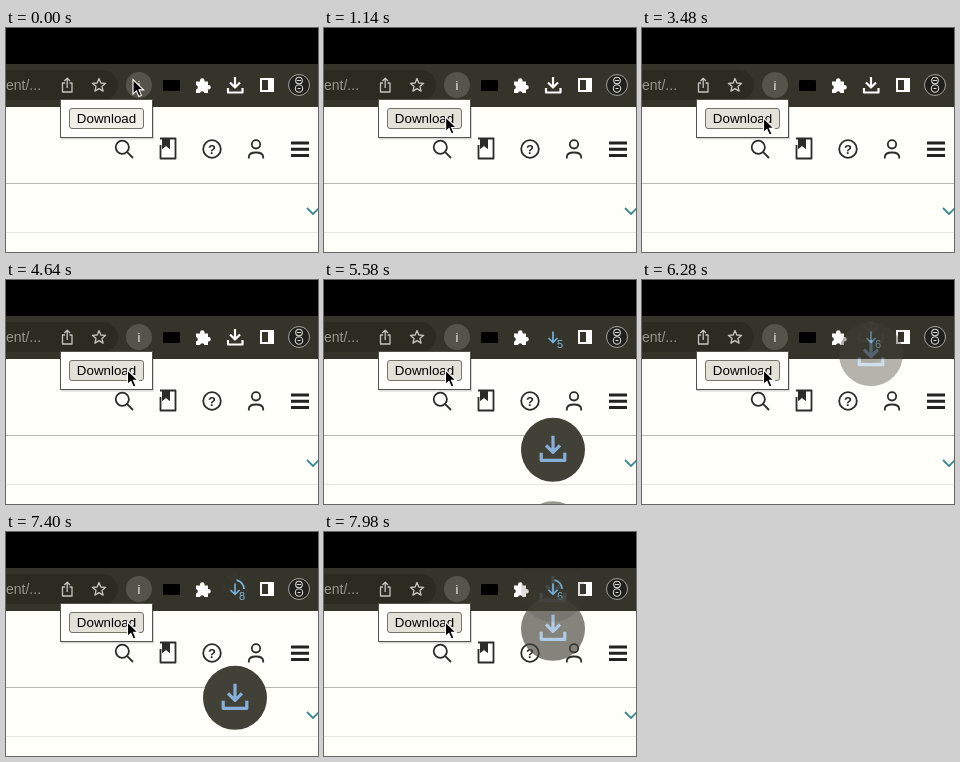
Animation, 312 px wide and 224 px high, one loop 8000 ms. Source, as an HTML page:

```html
<!DOCTYPE html>
<html lang="en">
<head>
<meta charset="utf-8">
<title>Download popup</title>
<style>
  html, body { margin: 0; width: 100%; height: 100%; overflow: hidden; background: #fffffa; }
  svg { display: block; width: 312px; height: 224px; }
  text { font-family: "Liberation Sans", Arial, sans-serif; }
  .line { fill: none; stroke-linejoin: round; }
</style>
</head>
<body>
<svg viewBox="0 0 312 224" xmlns="http://www.w3.org/2000/svg">
  <defs>
    <clipPath id="window"><rect y="41" width="312" height="183"/></clipPath>
    <g id="bubble">
      <circle r="32" fill="#424138"/>
      <path class="line" stroke="#86afd9" stroke-width="3.2" stroke-linejoin="miter"
        d="M0-14V2M-7-4.5L0 2.5L7-4.5M-11.8 3V10.5H11.8V3"/>
    </g>
  </defs>

  <!-- page -->
  <rect width="312" height="224" fill="#fffffa"/>
  <path d="M0 155.5H312" stroke="#b8b8b2"/>
  <path d="M0 204.5H312" stroke="#e6e6de"/>
  <path class="line" d="M301 180L307 186L313 180" stroke="#3d8c93" stroke-width="1.8"/>
  <g class="line" stroke="#2b2b28" stroke-width="1.8">
    <circle cx="116.3" cy="119.3" r="6.6"/>
    <path d="M121.2 124.2L127 130"/>
    <path d="M154.5 117V130.5H169.5V110.5H154"/>
    <path d="M156.5 111V120.5L160 117.5L163.5 120.5V111" fill="#2b2b28" stroke-width="1"/>
    <circle cx="206" cy="121" r="8.8"/>
    <circle cx="250" cy="116.3" r="4.2"/>
    <path d="M242.8 130.5V129Q243 124.5 250 124.5Q257 124.5 257.2 129V130.5"/>
  </g>
  <text x="206" y="125.6" font-size="13" font-weight="bold" text-anchor="middle" fill="#2b2b28">?</text>
  <path d="M285 115H303M285 121.2H303M285 127.4H303" stroke="#23231f" stroke-width="3"/>

  <!-- browser bar -->
  <rect width="312" height="36" fill="#000"/>
  <rect y="36" width="312" height="43" fill="#35342a"/>
  <rect x="-30" y="42" width="142" height="30" rx="15" fill="#2c2b22"/>
  <text x="0" y="62" font-size="14" fill="#96968c">ent/...</text>
  <g class="line" stroke="#c4c4be" stroke-width="1.3">
    <path d="M59 55H56.5V64H66V55H63.5M61.2 60V50.5M58.4 53L61.2 50.2L64 53"/>
    <path id="star"/>
  </g>
  <circle cx="133" cy="57" r="13" fill="#55544a"/>
  <text x="133" y="61.5" font-size="13" text-anchor="middle" fill="#eeeee8">i</text>
  <rect x="157" y="52" width="17" height="11" rx="1" fill="#000"/>
  <path fill="#fff" d="M190 53.5H194V52.5A2.3 2.3 0 0 1 198.6 52.5V53.5H202V57H202.5A2.3 2.3 0 0 1 202.5 61.6H202V65H198.5A2.3 2.3 0 0 0 194 65H190V61.5A2.3 2.3 0 0 0 190 57Z"/>
  <path id="idle" class="line" stroke="#fff" stroke-width="2.2" stroke-linejoin="miter"
    d="M229 49V59M224 54.5L229 59.5L234 54.5M222 60V64.5H236.5V60"/>
  <g id="busy">
    <path class="line" stroke="#72b2de" stroke-width="1.7" d="M229 51.5V62M224.5 58L229 62.5L233.5 58"/>
    <path id="ring" class="line" stroke="#7fbfe2" stroke-width="1.7"/>
    <text id="count" x="236" y="68" font-size="11" text-anchor="middle" fill="#86bfe4"></text>
  </g>
  <rect x="255" y="51" width="12" height="12" fill="none" stroke="#fff" stroke-width="2"/>
  <rect x="262" y="51" width="5" height="12" fill="#fff"/>
  <circle cx="293" cy="57" r="10.5" fill="#20201d" stroke="#a3a39c"/>
  <g class="line" stroke="#d8d8d0" stroke-width="1.1">
    <circle cx="293" cy="52.5" r="3.3"/>
    <circle cx="293" cy="60.5" r="3.7"/>
    <path d="M291 52.5H295M291.5 60.5H294.5"/>
  </g>

  <!-- popup -->
  <rect x="55" y="73" width="93" height="38.5" fill="#000" opacity=".15"/>
  <rect x="54.5" y="71.5" width="92" height="38" fill="#fffffc" stroke="#52524a"/>
  <rect id="button" x="63.5" y="80.5" width="74" height="20" rx="2.5" stroke="#74746a"/>
  <text x="100.5" y="95" font-size="13.333" text-anchor="middle" fill="#000">Download</text>

  <g id="bubbles" clip-path="url(#window)"></g>
  <path id="cursor" fill="#000" stroke="#fff" stroke-width="1.1"
    d="M0 0V14.5L3.4 11.4L5.8 17L8.4 15.9L6 10.4H10.6Z"/>
</svg>
<script>
const LOOP = 8000, RISE = 1200, BUSY_FROM = 4700;
const starts = [5229, 5480, 6300, 7035, 7321];
const counts = [[4700, 1], [4900, 2], [5080, 3], [5229, 4], [5480, 5],
  [5900, 6], [6300, 7], [7035, 8], [7600, 7], [7800, 6]];

const $ = id => document.getElementById(id);
const set = (el, attrs) => { for (const k in attrs) el.setAttribute(k, attrs[k]); };
const mix = (a, b, p) => a + (b - a) * p;
const clamp = v => Math.min(1, Math.max(0, v));
const smooth = p => p * p * (3 - 2 * p);
const easeOut = p => 1 - (1 - p) ** 2;
const polar = (x, y, r, deg) => {
  const a = deg * Math.PI / 180;
  return `${(x + r * Math.cos(a)).toFixed(2)} ${(y + r * Math.sin(a)).toFixed(2)}`;
};

const starPoints = Array.from({ length: 10 }, (_, i) =>
  polar(93, 57.5, i % 2 ? 3.1 : 7, i * 36 - 90));
set($('star'), { d: `M${starPoints.join('L')}Z` });

const bubbles = starts.map(() => {
  const use = document.createElementNS('http://www.w3.org/2000/svg', 'use');
  set(use, { href: '#bubble' });
  return $('bubbles').appendChild(use);
});

function buttonColor(t, y) {
  if (t >= 2500 && t < 2640) return '#f5f5ee';
  return y > 80 ? '#e2e2d9' : '#efefe8';
}

function draw(t) {
  const move = smooth(clamp(t / 1260));
  const x = mix(127, 121.5, move), y = mix(51.5, 90, move);
  set($('cursor'), { transform: `translate(${x} ${y})` });
  set($('button'), { fill: buttonColor(t, y) });

  const busy = t >= BUSY_FROM;
  set($('idle'), { visibility: busy ? 'hidden' : 'visible' });
  set($('busy'), { visibility: busy ? 'visible' : 'hidden' });
  const step = counts.filter(c => c[0] <= t).pop();
  $('count').textContent = step ? step[1] : '';
  const end = mix(-80, 0, clamp((t - 6400) / 900));
  set($('ring'), { d: t > 6400 ? `M${polar(229, 57, 9, -80)}A9 9 0 0 1 ${polar(229, 57, 9, end)}` : '' });

  // Each bubble slows as it rises and is most opaque halfway up.
  bubbles.forEach((el, i) => {
    const p = easeOut(clamp((t - starts[i]) / RISE));
    set(el, {
      transform: `translate(229 ${mix(293, 47, p)})`,
      opacity: 1 - 4 * (p - 0.5) ** 2
    });
  });
}

const origin = performance.now();
function tick() {
  draw((performance.now() - origin) % LOOP);
  requestAnimationFrame(tick);
}
draw(0);
requestAnimationFrame(tick);
</script>
</body>
</html>
```
